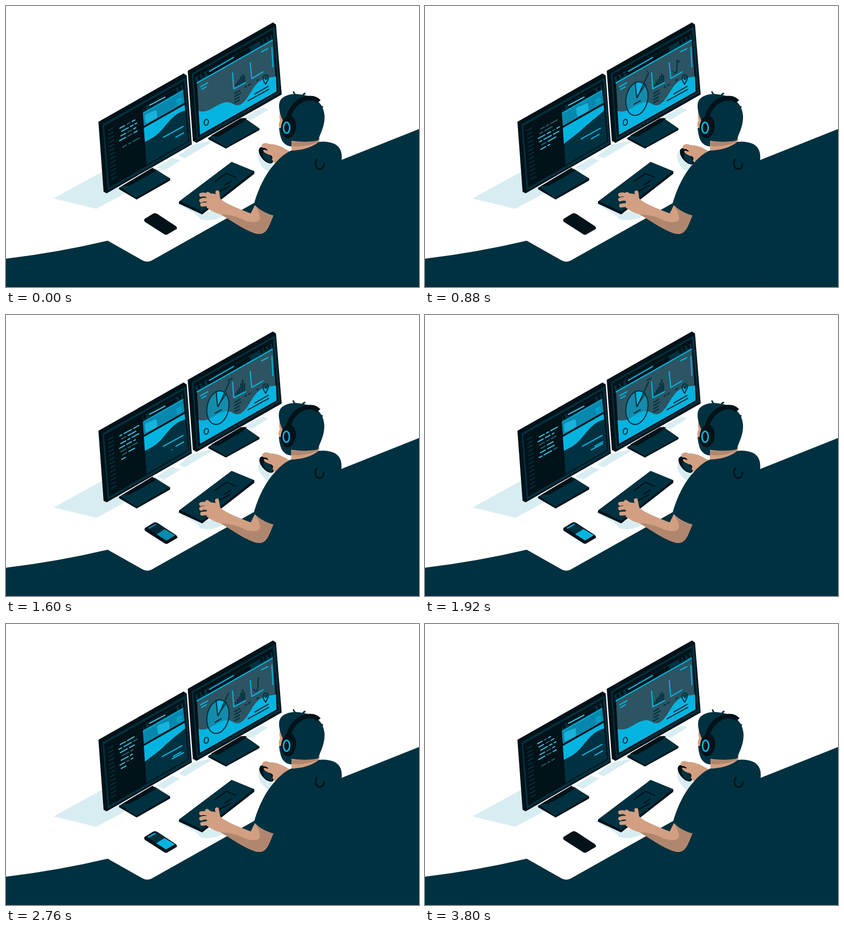
Recreate the animation shown at these times as an HTML page. Size 800 by 546 pixels, loop 3840 ms.

```html
<!DOCTYPE html>
<html lang="en">
<head>
<meta charset="utf-8">
<title>At the desk</title>
<style>
html, body { margin: 0; width: 100%; height: 100%; overflow: hidden; background: #fff }
svg { display: block; width: 100vw; height: 100vh }
.ink { fill: #011218 } .navy { fill: #003140 } .cyan { fill: #04b4e0 } .mist { fill: #d8edf2 }
.skin { fill: #d29f82 } .shade { fill: #b0866f }
.line { fill: none; stroke-linecap: round; stroke-linejoin: round; stroke-width: 2.2 }
.sInk { stroke: #011218 } .sNavy { stroke: #00313f } .sCyan { stroke: #04b4e0 } .sSkin { stroke: #d29f82 }
</style>
</head>
<body>
<svg viewBox="0 0 800 546">
  <path class="navy" d="M0 491Q100 479 197 456L264 494Q274 500 285 493L480 383L650 299L800 239V546H0Z"/>

  <g class="mist">
    <path d="M92 374L190 320L238 360L175 394Z"/>
    <path d="M291 314L322 295L338 300L306 320Z"/>
    <path d="M334 291L362 270L395 262L399 264L346 296Z"/>
    <path d="M462 216L497 197L508 201L475 222Z"/>
    <path d="M331 384L340 381L384 402L418 391L432 402Q400 422 376 414Q370 404 356 398Z"/>
    <path d="M490 284Q485 300 498 314L508 323L520 305Z"/>
    <path d="M266 418L270 412L314 441L307 445Z"/>
  </g>

  <!-- left monitor -->
  <path class="ink" d="M219 353L288 317L318 335V339L253 376L219 356Z"/>
  <path class="navy" d="M222 352L288 316L317 335L252 373Z"/>
  <path class="ink" d="M224 350L284 314L290 321L240 349Z"/>
  <path class="ink" d="M179 225L344 131L350 135L360 269L195 364L189 361Z"/>
  <path class="navy" d="M187 230L348 139L358 267L197 359Z"/>
  <path class="ink" d="M190 233L345 145L355 263L200 353Z"/>
  <path class="navy" d="M265 197L342 153L353 262L272 309Z"/>
  <path id="sidebar" class="line sNavy"/>
  <g id="code" class="line"></g>
  <path class="line sInk" style="stroke-width:7" d="M279 194L328 166"/>
  <path class="line" stroke="#45c2e2" d="M278 193L308 177"/>
  <path class="ink" d="M266 199a3 4 0 1 0 6-1a3 4 0 1 0-6 1M334 161a3 4 0 1 0 6-1a3 4 0 1 0-6 1"/>
  <path fill="#0688ae" d="M265 208L343 164L346 188L267 233Z"/>
  <path class="line sCyan" style="stroke-width:1.5" d="M266 208L343 164"/>
  <path id="card" fill="#16b3dc" d="M271 210L289 203Q292 202 292 205L293 214Q293 217 290 219L274 227Q270 228 270 225L269 214Q269 211 271 210Z"/>
  <path class="line sCyan" style="stroke-width:1.8" d="M331 183l8-4M331 187l9-5M332 191l8-4"/>
  <path id="wave" class="cyan"/>
  <path class="line sInk" style="stroke-width:2.6" d="M267 235L346 190"/>
  <path id="captions" class="line sCyan"/>

  <!-- right monitor -->
  <path class="ink" d="M392 256L461 217L491 238V241L426 277L392 259Z"/>
  <path class="navy" d="M395 256L461 218L490 238L426 274Z"/>
  <path class="ink" d="M397 252L455 218L467 218L457 227L411 254Z"/>
  <path class="ink" d="M352 126L517 32L523 36L534 172L369 266L362 262Z"/>
  <path class="navy" d="M360 131L521 40L531 169L370 261Z"/>
  <path class="ink" d="M363 133L517 46L528 167L372 256Z"/>
  <path class="navy" d="M366 139L515 55L517 67L370 150Z"/>
  <path fill="#2d5462" d="M370 149L517 66L524 166L376 250Z"/>
  <path class="cyan" d="M373 204C389 209 402 196 416 190S434 187 443 192C462 199 472 166 485 152C499 137 511 140 523 137L524 166L376 250Z"/>
  <path class="line sCyan" d="M370 149.500L516 66.500"/>
  <path class="line sInk" style="stroke-width:8" d="M393 130L470 86"/>
  <path class="line sCyan" d="M394 127L441 100"/>
  <path class="ink" d="M371 140a3 4 0 1 0 6-1a3 4 0 1 0-6 1M379 135a3 4 0 1 0 6-1a3 4 0 1 0-6 1M492 71a3 4 0 1 0 6-1a3 4 0 1 0-6 1M499 67a3 4 0 1 0 6-1a3 4 0 1 0-6 1M507 62a3 4 0 1 0 6-1a3 4 0 1 0-6 1"/>
  <path class="line sCyan" d="M377 157l14-8M379 162l9-5M495 89l12-6M515 80L517 118M439 130L441 161L464 149M473 110L476 141L498 128"/>
  <path class="line sNavy" d="M443 170l10-6M443 176l12-7M443 182l9-5M443 188l9-5M463 158l3-2M470 154l3-2M486 145l3-2M482 171l26-15M469 184l40-22"/>
  <path class="line sNavy" d="M503 152Q497 144 498 139Q500 133 505 134Q510 137 507 144ZM502 141a1.5 2 0 1 0 3-1a1.5 2 0 1 0-3 1"/>
  <ellipse class="line sNavy" cx="388" cy="226" rx="4" ry="5.800" transform="rotate(12 388 226)"/>
  <path id="bars" class="line sNavy" style="stroke-width:2.5"/>
  <path id="graph" class="line sNavy" pathLength="100" d="M480 127Q483 132 486 129Q489 126 488 107Q489 103 491 107T494 105L497 101"/>
  <g id="pie">
    <ellipse class="cyan" fill-opacity=".58" cx="410.500" cy="180" rx="21" ry="33" transform="rotate(11 410.5 180)"/>
    <path class="cyan" d="M410 180L407 149Q419 144 427 152Z"/>
    <path class="line sNavy" d="M410 178L407 148M410 178L427 152M405 191l12-7"/>
    <ellipse class="line sNavy" cx="410.500" cy="180" rx="21" ry="33" transform="rotate(11 410.5 180)"/>
  </g>
  <path id="pointer" class="line sNavy"/>
  <path id="tick" class="line sNavy"/>

  <!-- keyboard and phone -->
  <path class="ink" d="M335 380L437 303L481 321V326L380 405L335 384Z"/>
  <path class="navy" d="M337 379L437 303L480 321L380 400Z"/>
  <path class="line sInk" d="M405 341L427 325L445 333M424 348l12-8M412 361l22-12"/>
  <g id="phone">
    <path class="ink" d="M268 414L284 404Q288 401 293 404L328 427Q332 430 331 433L314 443Q310 446 306 443L270 420Q267 418 268 414Z"/>
    <g id="phoneScreen">
      <path class="navy" d="M272 413L289 404L327 428L310 438Z"/>
      <path class="cyan" d="M291 426L307 416L327 428L310 438Z"/>
      <path class="line sCyan" d="M276 414l13-7"/>
    </g>
  </g>

  <!-- mouse and right hand -->
  <g id="mouseHand">
    <ellipse class="ink" cx="504" cy="290" rx="19" ry="10" transform="rotate(50 504 290)"/>
    <ellipse class="navy" cx="506" cy="294" rx="12" ry="6" transform="rotate(50 506 294)"/>
    <path class="skin" d="M496 269Q501 264 509 268Q524 268 538 276L560 288L528 310Q517 304 515 298Q518 293 513 290Q505 288 500 284Q496 280 500 279L507 281L505 276L498 276Q493 273 496 269Z"/>
  </g>

  <g id="body">
    <path class="skin" d="M535 196Q527 208 531 222Q526 231 531 239L553 262V286L602 280L608 258L575 210Z"/>
    <path class="shade" d="M553 264Q583 264 606 256L604 264Q579 275 554 272Z"/>
    <path class="navy" d="M480 386C488 356 503 325 521 306Q535 289 552 281Q586 280 606 264Q621 262 634 267C647 272 652 284 650 300L665 546H500L518 408Q496 402 480 386Z"/>
    <path class="line sInk" style="stroke-width:2.8" d="M602 298C597 306 600 317 608 317Q616 316 616 306"/>
    <path class="navy" d="M529 237Q538 235 553 248V273Q541 272 535 262Q530 252 529 237Z"/>
    <path class="navy" d="M536 222C529 207 525 187 535 179Q545 171 560 171C591 172 615 184 617 213C618 235 608 248 605 261Q583 266 553 262Q544 237 536 222Z"/>
    <path class="line sNavy" style="stroke-width:3" d="M562 173Q558 171 557 167M575 174Q576 171 579 170M600 190Q607 196 613 196"/>
    <path class="line sInk" style="stroke-width:9;stroke-linecap:butt" d="M547 220C549 200 567 178 590 179Q600 179 606 186"/>
    <ellipse class="ink" cx="547.500" cy="235" rx="14.500" ry="22" transform="rotate(7 547.5 235)"/>
    <ellipse class="line sCyan" style="stroke-width:3" cx="543.500" cy="236.500" rx="6" ry="10.500"/>
  </g>

  <!-- typing arm -->
  <path class="skin" d="M389 366Q408 360 416 375Q424 384 474 403L482 387Q497 402 518 407C511 422 507 443 490 443C472 442 440 419 416 405Q401 401 389 392Z"/>
  <path class="shade" d="M416 405Q437 405 457 414C475 423 493 422 492 411Q492 402 482 387Q497 402 518 407C511 422 507 443 490 443C472 442 440 419 416 405Z"/>
  <path id="fingers" class="line sSkin" style="stroke-width:7.5"/>
</svg>
<script>
const LOOP = 3840, HALF = LOOP / 2;
const $ = id => document.getElementById(id);
const clamp = x => Math.max(0, Math.min(1, x));
const ramp = (t, a, b) => clamp((t - a) / (b - a));
const smooth = x => x * x * (3 - 2 * x);
const ease = (t, a, b) => smooth(ramp(t, a, b));
const pulse = (t, a, b, c, d) => ease(t, a, b) - ease(t, c, d);
const mix = (a, b, k) => a + (b - a) * k;
const set = (id, name, value) => $(id).setAttribute(name, value);
const shift = (id, x, y) => set(id, 'transform', `translate(${x} ${y})`);

// keys: [time, value] pairs, eased between neighbours
function track(t, keys) {
  let i = 1;
  while (i < keys.length - 1 && t > keys[i][0]) i++;
  const [t0, a] = keys[i - 1], [t1, b] = keys[i];
  return mix(a, b, ease(t, t0, t1));
}

let seed = 11;
const random = () => (seed = seed * 16807 % 2147483647) / 2147483647;
const SLOPE = -0.55, ROWS = 20, PITCH = 7.68, GAP = 5;

const codeRows = Array.from({ length: ROWS }, (_, row) => {
  const parts = [];
  let x = [0, 2, 5, 3][row % 4];
  const end = 25 + random() * 16;
  while (row !== GAP && x < end - 3) {
    const width = Math.min(end - x, 4 + random() * 11);
    parts.push({ x, width, color: random() < 0.7 ? '#37bbdc' : '#23606f' });
    x += width + 4;
  }
  return parts;
});

$('sidebar').setAttribute('d', Array.from({ length: 13 }, (_, i) =>
  `M${198 + i * 0.55} ${242 + i * 7.9}l9-5`).join(''));

function drawCode(t) {
  const length = ROWS * PITCH;
  let out = '';
  codeRows.forEach((parts, row) => {
    const y = 231 + (row * PITCH - t / LOOP * length + length) % length;
    if (y > 284) return;
    const typed = clamp((284 - y) / PITCH) * 42;
    const left = 218 + (y - 231) * 0.065;
    for (const { x, width, color } of parts) {
      const w = Math.min(width, typed - x);
      if (w > 0) out += `<path stroke="${color}" d="M${left + x} ${y + x * SLOPE}l${w} ${w * SLOPE}"/>`;
    }
  });
  $('code').innerHTML = out;
}

function drawLeftPage(t, p) {
  const slide = pulse(p, 560, 820, 1290, 1480);
  shift('card', 24 * slide, -13.5 * slide);
  const k = pulse(p, 640, 900, 1290, 1480);
  set('wave', 'd', `M267 237L346 192L347 203C${mix(328, 330, k)} ${mix(208, 218, k)} ${mix(319, 310, k)} ${mix(220, 234, k)} 305 ${mix(237, 239, k)}S${mix(282, 285, k)} ${mix(257, 255, k)} 269 ${mix(264, 268, k)}Z`);
  const drift = pulse(p, 640, 1180, 1290, 1480);
  const extra = pulse(t, 1600, 1880, 2780, 3000);
  let d = `M${305 - 7 * drift} ${255 + 8 * drift}l38-21M${329 - 16 * drift} ${255 + 7 * drift}l15-8.5`;
  if (extra) d += `M322 262l${22 * extra} ${-12 * extra}`;
  set('captions', 'd', d);
}

function drawCharts(t, p) {
  const head = 100 * ramp(p, 520, 960), tail = 100 * ramp(p, 830, 1550);
  set('graph', 'display', head > tail ? 'inline' : 'none');
  set('graph', 'stroke-dasharray', `0 ${tail} ${Math.max(0, head - tail)} 200`);

  const lift = track(t, [[0, 0], [880, 0.15], [1920, 1], [2760, 0.7], [3400, 0], [LOOP, 0]]);
  set('bars', 'd', [4, 7, 9, 13, 15, 11].map((h, i) => {
    const x = 445 + i * 3.4;
    return `M${x} ${156 - i * 1.8}v${-h * (1 + lift * [0, 0.1, 0.2, 0.35, 0.55, 0.25][i])}`;
  }).join(''));

  const size = pulse(t, 160, 600, 3180, 3620);
  set('pie', 'transform', `translate(411 178) scale(${size}) translate(-411 -178)`);
  const reach = pulse(t, 500, 860, 2680, 3120);
  set('pointer', 'd', reach ? `M411 178L${411 + 22 * reach} ${178 - 48 * reach}` : '');
  const tick = pulse(t, 860, 1040, 2480, 2680);
  set('tick', 'd', tick ? `M430 127l${8 * tick} ${-4 * tick}` : '');
}

function drawPerson(t) {
  const sway = track(t, [[0, 0], [880, -1], [1280, 0], [1920, -1], [2600, 0], [LOOP, 0]]);
  shift('body', sway, 0);
  const glide = track(t, [[0, 0], [880, 4], [1280, 1], [1920, 1.5], [2760, 1], [3400, -2], [LOOP, 0]]);
  shift('mouseHand', glide, glide * 0.5);
  const tap = (n, phase) => Math.sin(t / LOOP * 2 * Math.PI * n + phase) * 1.2;
  const a = tap(13, 0), b = tap(11, 2), c = tap(12, 4), d = tap(9, 1);
  set('fingers', 'd', `M378 ${367 + a}Q386 ${364 + a} 398 373M378 ${377 + b}Q386 ${373 + b} 400 379M380 ${387 + c}Q390 ${386 + c} 401 385M${390 + d} ${364 + d}L403 373M${409 + d / 2} ${361 + d}L411 374`);
}

function drawPhone(t) {
  const buzzing = t > 1480 && t < 1860;
  shift('phone', buzzing ? Math.sin(t / 18) * 0.9 : 0, buzzing ? Math.cos(t / 18) * 0.5 : 0);
  set('phoneScreen', 'opacity', pulse(t, 1520, 1640, 3520, 3660));
}

function frame(now) {
  const t = now % LOOP, p = t % HALF;
  drawCode(t);
  drawLeftPage(t, p);
  drawCharts(t, p);
  drawPerson(t);
  drawPhone(t);
  requestAnimationFrame(frame);
}
frame(0);
</script>
</body>
</html>
```
